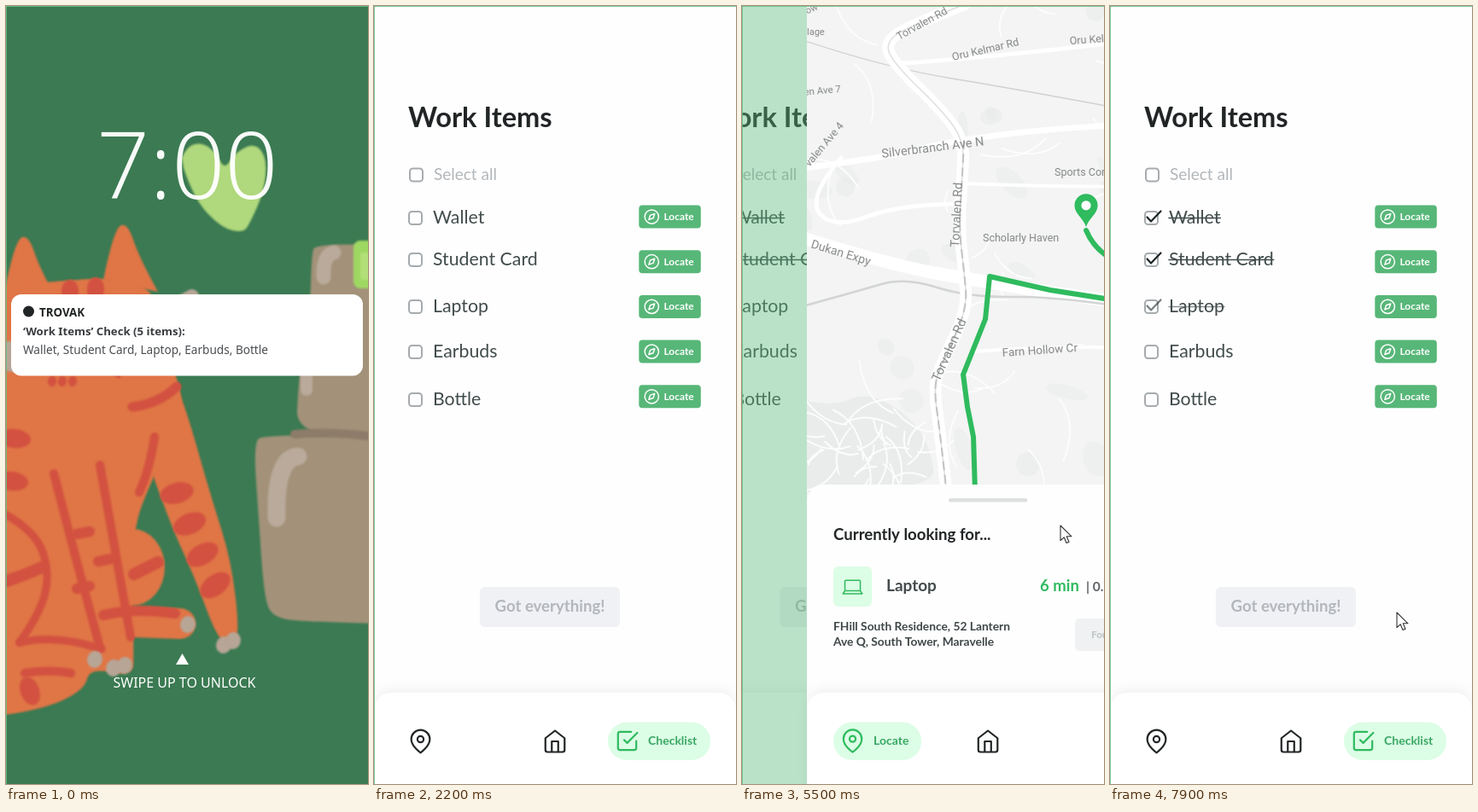
These frames come from a looping animation (424 px wide and 912 px high, 8 s). An HTML page with a canvas:

```html
<!DOCTYPE html>
<html lang="en">
<head>
<meta charset="utf-8">
<title>Packing checklist</title>
<style>
  html, body { margin: 0; width: 100%; height: 100%; overflow: hidden; background: #58b87b; }
  canvas { display: block; width: 424px; height: 912px; }
</style>
</head>
<body>
<canvas id="stage"></canvas>
<script>
const W = 424, H = 912, LOOP = 8000;
const DPR = window.devicePixelRatio || 1;
const GREEN = '#57b778', MINT = '#dcfde6', ROUTE = '#2fbb5e', INK = '#222526';
const BACK = '#58b87b', PAPER = '#fefefe', SLATE = '#414b4b';
const UI = 'Lato, sans-serif', LOCK = '"Noto Sans", sans-serif', MAP = 'Roboto, sans-serif';

const canvas = document.getElementById('stage');
canvas.width = W * DPR;
canvas.height = H * DPR;
let c = canvas.getContext('2d');
c.scale(DPR, DPR);

const ICONS = {
  pin: 'M21 10c0 7-9 13-9 13s-9-6-9-13a9 9 0 0 1 18 0zM15 10a3 3 0 1 1-6 0a3 3 0 1 1 6 0',
  home: 'M3 9l9-7 9 7v11a2 2 0 0 1-2 2H5a2 2 0 0 1-2-2zM9 22V12h6v10',
  check: 'M9 11l3 3L22 4M21 12v7a2 2 0 0 1-2 2H5a2 2 0 0 1-2-2V5a2 2 0 0 1 2-2h11',
  compass: 'M22 12a10 10 0 1 1-20 0a10 10 0 1 1 20 0M16.2 7.8l-2.1 6.3-6.3 2.1 2.1-6.3z',
  laptop: 'M5 5h14a1 1 0 0 1 1 1v10H4V6a1 1 0 0 1 1-1zM2 19h20l-2-3H4z',
  close: 'M6 6l12 12M18 6L6 18'
};
for (const k in ICONS) ICONS[k] = new Path2D(ICONS[k]);
const MARKER = new Path2D('M0 0C-3-10-14-16-14-26A14 14 0 0 1 14-26C14-16 3-10 0 0z');
const ARROW = new Path2D('M0 0V17.5L4.2 13.8L7 20.5L10 19.2L7.2 12.8H13z');
const HAND = new Path2D('M-2 1c0-3 4-3 4 0v8c1-2 4-1.5 4 .5c1-1.5 3.5-1 3.5 1c1-1 3 0 3 2v5c0 5-2 8-7 8s-6-2-8-6l-4-6c-1-2 1-3 3-1.5l1.5 2z');

// ---- helpers ----
const mix = (a, b, p) => a + (b - a) * p;
function ramp(t, start, dur) {
  const u = Math.min(1, Math.max(0, (t - start) / dur));
  return u * u * (3 - 2 * u);
}
function fade(alpha, draw) {
  if (alpha <= 0) return;
  c.save();
  c.globalAlpha *= alpha;
  draw();
  c.restore();
}
function shift(x, draw) {
  c.save();
  c.translate(x, 0);
  draw();
  c.restore();
}
function cover(color) {
  c.fillStyle = color;
  c.fillRect(0, 0, W, H);
}
function text(s, x, y, font, color, align = 'left') {
  c.font = font;
  c.fillStyle = color;
  c.textAlign = align;
  c.fillText(s, x, y);
}
function label(s, x, y, deg = 0, size = 12.5, color = '#858788') {
  c.save();
  c.translate(x, y);
  c.rotate(deg * Math.PI / 180);
  text(s, 0, 0, `${size}px ${MAP}`, color);
  c.restore();
}
function box(x, y, w, h, r, color) {
  c.beginPath();
  c.roundRect(x, y, w, h, r);
  c.fillStyle = color;
  c.fill();
}
function oval(x, y, rx, ry, deg, color) {
  c.beginPath();
  c.ellipse(x, y, rx, ry, deg * Math.PI / 180, 0, 7);
  c.fillStyle = color;
  c.fill();
}
// Soft curve that rounds every inner point.
function trace(p) {
  const n = p.length;
  c.beginPath();
  c.moveTo(p[0], p[1]);
  for (let i = 2; i < n - 4; i += 2)
    c.quadraticCurveTo(p[i], p[i + 1], (p[i] + p[i + 2]) / 2, (p[i + 1] + p[i + 3]) / 2);
  if (n > 4) c.quadraticCurveTo(p[n - 4], p[n - 3], p[n - 2], p[n - 1]);
  else c.lineTo(p[2], p[3]);
}
function shape(p, color) {
  trace(p);
  c.closePath();
  c.fillStyle = color;
  c.fill();
}
function stroke(color, w) {
  c.strokeStyle = color;
  c.lineWidth = w;
  c.lineCap = c.lineJoin = 'round';
  c.stroke();
}
function line(p, color, w) {
  trace(p);
  stroke(color, w);
}
function poly(p, color, w) {
  c.beginPath();
  for (let i = 0; i < p.length; i += 2) c.lineTo(p[i], p[i + 1]);
  stroke(color, w);
}
function icon(name, x, y, size, color, w = 2.2) {
  c.save();
  c.translate(x, y);
  c.scale(size / 24, size / 24);
  c.translate(-12, -12);
  c.strokeStyle = color;
  c.lineWidth = w * 24 / size;
  c.lineCap = c.lineJoin = 'round';
  c.stroke(ICONS[name]);
  c.restore();
}
function layer(draw) {
  const el = document.createElement('canvas'), main = c;
  el.width = W * DPR;
  el.height = H * DPR;
  c = el.getContext('2d');
  c.scale(DPR, DPR);
  draw();
  c = main;
  return el;
}

// ---- wallpaper ----
function drawBag() {
  const bag = '#a39279', shine = '#baaa9b';
  shape([440, 280, 362, 278, 358, 292, 356, 360, 342, 440, 340, 510, 440, 510], bag);
  shape([440, 506, 300, 500, 290, 516, 296, 600, 302, 690, 312, 718, 360, 722, 440, 724], bag);
  line([338, 502, 380, 498, 430, 505], '#8d7c69', 10);
  line([372, 318, 371, 292, 384, 289], shine, 17);
  line([352, 430, 352, 450], shine, 14);
  line([317, 600, 315, 530, 342, 528], shine, 21);
  box(407, 275, 30, 56, 8, '#9ed862');
  box(415, 289, 20, 32, 4, '#b3df78');
}
function drawCat() {
  const orange = '#e07546', red = '#d25140', paw = '#b7a596';
  for (const [x, y] of [[22, 277], [138, 263]])
    shape([x - 24, y + 58, x - 12, y - 1, x + 4, y - 10, x + 18, y + 32, x + 40, y + 72], orange);
  shape([-10, 328, 60, 323, 118, 318, 176, 330, 190, 410, 212, 470, 172, 552, 146, 620,
    150, 760, 148, 786, 98, 776, 92, 802, 40, 826, -10, 832], orange);
  shape([186, 410, 206, 455, 240, 575, 264, 650, 274, 738, 262, 750, 246, 738, 222, 672, 190, 602, 165, 530], orange);
  oval(148, 658, 38, 45, 0, orange);
  line([150, 722, 204, 724], orange, 36);

  for (let i = 0; i < 2; i++) {
    line([56 + 54 * i, 548 - 10 * i, 82 + 46 * i, 650 - 10 * i, 110 + 36 * i, 752 - 12 * i], red, 10);
    oval(75 + 30 * i, 335 - 3 * i, 10, 14, 0, red);
    oval(10 - 3 * i, 507 + 50 * i, 19, 11, 6, red);
  }
  for (let i = 0; i < 4; i++) oval(200 + 15 * i, 571 + 36 * i, 20, 12, -15 - 7 * i, red);
  for (let i = 0; i < 3; i++) line([83 + 25 * (i % 2), 619 + 32 * i, 98 + 25 * (i % 2), 616 + 32 * i], red, 12);
  line([150, 666, 178, 652], red, 14);
  line([114, 714, 150, 705, 198, 712], red, 12);
  line([174, 505, 168, 545, 156, 570], red, 10);
  line([148, 470, 180, 466, 200, 446], red, 11);
  line([-4, 594, 35, 615, 52, 668, 38, 715, 16, 746], red, 9);
  line([16, 746, 60, 736, 112, 754], red, 9);
  line([-5, 676, 20, 668, 42, 658], red, 14);
  line([22, 782, 50, 777, 76, 782], red, 10);
  oval(28, 803, 11, 17, -20, red);

  for (let i = 0; i < 6; i++)
    for (const side of [-1, 1])
      oval(110 + side * (32 + 12 * (i % 3)), 420 - side * 8 + 12 * (i % 2), 5, 6, 10, red);
  line([114, 402, 114, 422, 132, 434], red, 5);
  line([172, 372, 198, 350, 218, 340], paw, 16);
  oval(180, 371, 22, 15, -28, paw);
  oval(8, 411, 21, 18, 12, paw);
  for (const [x, y] of [[45, 380], [155, 356]]) {
    oval(x, y, 20, 13, -8, '#f0f1ec');
    oval(x - 2, y, 9, 9, 0, '#2c3330');
  }
  c.save();
  c.rotate(-.04);
  box(80, 384, 38, 25, 9, '#363b39');
  c.restore();
  for (const [x, y] of [[104, 766], [126, 776], [139, 773], [213, 725], [255, 749], [266, 744]])
    oval(x, y, 9, 10, 15, paw);
}
const art = layer(() => {
  c.filter = `blur(${1.2 * DPR}px)`;
  shape([206, 178, 212, 164, 230, 160, 246, 172, 256, 192, 268, 172, 292, 160, 306, 180, 302, 218,
    286, 254, 278, 266, 252, 260, 220, 226, 208, 190], '#b0d87c');
  drawBag();
  drawCat();
});

function lockScreen() {
  c.drawImage(art, 0, 0, W, H);
  text('7:00', 106, 226, '300 109px "Open Sans", sans-serif', 'rgba(255,255,255,.96)');
  c.beginPath();
  c.moveTo(199, 772);
  c.lineTo(206.5, 759);
  c.lineTo(214, 772);
  c.fillStyle = '#fff';
  c.fill();
  text('SWIPE UP TO UNLOCK', 209, 799, `500 16px ${LOCK}`, '#fff', 'center');
}
function notice() {
  box(6, 338, 412, 95.5, 12, '#fff');
  oval(26.5, 358, 6.5, 6.5, 0, INK);
  text('TROVAK', 39, 364, `600 13.3px ${LOCK}`, INK);
  text('‘Work Items’ Check (5 items):', 20, 386, `600 13.2px ${LOCK}`, '#3a3d3f');
  text('Wallet, Student Card, Laptop, Earbuds, Bottle', 20, 408, `13.6px ${LOCK}`, '#4a4d50');
}

// ---- checklist ----
const ITEMS = [['Wallet', 255], ['Student Card', 304], ['Laptop', 359], ['Earbuds', 412], ['Bottle', 468]];

function tickBox(x, y) {
  c.beginPath();
  c.roundRect(x - 7.5, y - 7.5, 15, 15, 3.5);
  stroke('#a6abae', 2);
}
function navBar() {
  c.save();
  c.shadowColor = 'rgba(0,0,0,.05)';
  c.shadowBlur = 14 * DPR;
  c.shadowOffsetY = -5 * DPR;
  box(0, 805, W, 130, 20, '#fff');
  c.restore();
  icon('home', 212, 862, 30, INK);
}
function navPill(x, w, name, title) {
  box(x, 839.5, w, 44.5, 22, MINT);
  icon(name, x + 22.5, 861.5, 28.5, ROUTE);
  text(title, x + 47, 866, `bold 14px ${UI}`, '#38a762');
}
function checklist(done) {
  text('Work Items', 40, 142, `bold 32.6px ${UI}`, INK);
  tickBox(49.5, 198);
  text('Select all', 70, 204, `19px ${UI}`, '#b3b7ba');
  ITEMS.forEach(([name, base], i) => {
    const y = base - 6.5, by = 233.5 + 52.7 * i, font = `21.3px ${UI}`;
    tickBox(48.5, y);
    text(name, 69, base, font, SLATE);
    const end = 69 + c.measureText(name).width;
    fade(done[i] || 0, () => {
      poly([43.5, y - 1, 48, y + 4, 59.5, y - 8], '#1d2628', 2.2);
      poly([69, y, end, y], SLATE, 1.6);
    });
    box(310.3, by, 72.5, 27, 4, GREEN);
    icon('compass', 325.3, by + 13.5, 19.5, '#fff', 1.5);
    text('Locate', 339.5, by + 17.5, `bold 11.9px ${UI}`, '#fff');
  });
  box(124, 681, 164, 47, 6, '#f0f1f5');
  text('Got everything!', 206, 710, `bold 18.6px ${UI}`, '#b3b7bb', 'center');
  navBar();
  icon('pin', 54.5, 862, 29, INK);
  navPill(274, 120, 'check', 'Checklist');
}
function listPage(done) {
  cover(PAPER);
  checklist(done);
}

// ---- locate page ----
const MAIN_ROAD = [185, -2, 128, 20, 90, 42, 104, 70, 158, 122, 184, 158, 182, 200, 178, 260,
  184, 310, 188, 355, 160, 415, 148, 445, 156, 500, 163, 565];
const map = layer(() => {
  let seed = 11;
  const rnd = () => (seed = seed * 16807 % 2147483647) / 2147483647;
  cover('#f3f4f3');
  for (let i = 0; i < 24; i++)
    oval(rnd() * W, rnd() * 560, 8 + rnd() * 18, 5 + rnd() * 10, rnd() * 90, 'rgba(226,229,227,.3)');
  shape([-5, 462, 30, 470, 70, 452, 120, 480, 146, 520, 150, 570, -5, 570], '#eaecec');
  for (let i = 0; i < 60; i++) {
    const campus = i < 26, x = campus ? rnd() * 120 : rnd() * W, y = campus ? 475 + rnd() * 80 : rnd() * 550;
    const a = rnd() * 6.3, n = 12 + rnd() * 28;
    line([x, y, x + n * Math.cos(a), y + n * Math.sin(a),
      x + 2 * n * Math.cos(a + .6), y + 2 * n * Math.sin(a + .6)], '#fcfdfc', 2);
  }
  line([-5, 190, 90, 178, 170, 158, 300, 142, 430, 136], '#fff', 7);
  line([40, 178, 0, 225, 30, 262, 110, 232, 180, 232], '#fff', 5);
  line([185, 208, 280, 212, 430, 212], '#fff', 4);
  line([100, 68, 250, 58, 430, 34], '#fff', 5);
  line([195, 405, 340, 395, 430, 405], '#fff', 4);
  line([430, 386, 360, 440, 390, 500, 352, 565], '#fff', 6);
  line([-5, 272, 100, 304, 200, 322, 300, 338, 430, 356], '#fff', 15);
  line([-5, 40, 90, 72, 250, 98, 430, 132], '#d0d2d2', 1.3);
  line([-5, 352, 60, 334, 115, 318, 190, 342, 300, 340, 430, 362], '#d2d4d5', 2.5);
  line(MAIN_ROAD, '#fff', 14);
  line(MAIN_ROAD, '#dcdddd', 1.4);
  c.setLineDash([9, 7]);
  line(MAIN_ROAD.slice(10), '#c0c2c3', 2);
  c.setLineDash([]);
  label('Torvalen Rd', 108, 40, -29);
  label('Oru Kelmar Rd', 171, 64, -13);
  label('Oru Kelmar Rd', 308, 45, -4);
  label('ellow', -10, 14, -24, 11);
  label('lage', 0, 34, 0, 11);
  label('len Ave 7', -6, 105, -5, 11.5);
  label('valen Ave 4', 3, 189, -50);
  label('Silverbranch Ave N', 88, 178, -7, 14.5);
  label('Sports Complex', 290, 199);
  label('Scholarly Haven', 206, 276);
  label('Dukan Expy', 4, 283, 17, 14);
  label('Torvalen Rd', 178, 283, -87, 14.5);
  label('Torvalen Rd', 155, 441, -66, 15);
  label('Farn Hollow Cr', 229, 411, -4, 13.5);
});

function timing(x, time, dist) {
  text(time, x, 686, `bold 18.5px ${UI}`, ROUTE);
  const w = c.measureText(time).width;
  text('| ' + dist, x + w + 8, 686, `bold 15.5px ${UI}`, '#5d6366');
}
function foundButton(bg, fg) {
  box(314, 718, 83, 38, 5, bg);
  text('Found it!', 355.5, 741, `bold 11.3px ${UI}`, fg, 'center');
}
function locatePage(p) {
  c.drawImage(map, 0, 0, W, H);
  fade(1 - p, () => {
    line([327, 263, 335, 282, 368, 304, 430, 313], ROUTE, 6);
    poly([430, 318, 385, 321, 361, 327, 355, 344, 285, 333, 214, 317, 209, 367, 183, 432,
      188, 470, 195, 505, 197, 570], ROUTE, 6);
  });
  fade(p, () => {
    const pale = '#9a9c9d';
    label('Quorl Rd', 279, 96, 0, 13, pale);
    label('Brindlemoor Rd', 260, 125, 4, 12, pale);
    label('Mt Orvel Rise', 367, 104, -16);
    label('Lantern Ave N', 16, 121, 2, 13, pale);
    label('Scholarly Haven', 9, 420, 0, 21, pale);
    c.fillStyle = ROUTE;
    c.fillRect(194, 480, 9, 90);
  });
  c.save();
  c.translate(mix(327, 198, p), mix(259, 475, p));
  const size = mix(.97, 1.23, p);
  c.scale(size, size);
  c.fillStyle = ROUTE;
  c.fill(MARKER);
  oval(0, -26, 5.8, 5.8, 0, '#fff');
  c.restore();

  box(0, 561, W, 370, 20, PAPER);
  box(166, 577, 92, 4.5, 2, '#dedfe0');
  oval(395, 588, 16, 16, 0, '#f3f4f4');
  icon('close', 395, 588, 16, '#333', 1.6);
  text('Currently looking for...', 31, 626, `bold 18.6px ${UI}`, INK);
  box(31, 657, 45, 47, 6, MINT);
  icon('laptop', 53.5, 681, 27, ROUTE, 1.5);
  text('Laptop', 93, 686, `bold 19px ${UI}`, '#444b4d');
  fade(1 - p, () => timing(mix(273, 237, p), '6 min', '0.3 km'));
  fade(p, () => timing(mix(293, 257, p), '> 1 min', '0.05 km'));
  text('FHill South Residence, 52 Lantern', 31, 732, `bold 13.8px ${UI}`, '#3f4648');
  text('Ave Q, South Tower, Maravelle', 31, 750, `bold 13.8px ${UI}`, '#3f4648');
  foundButton('#eff1f2', '#bcc1c3');
  fade(p, () => foundButton(GREEN, '#fff'));

  navBar();
  navPill(31, 103, 'pin', 'Locate');
  icon('check', 370, 862, 28, INK);
}

// ---- cursor: arrival, departure, place, pointing hand ----
const STOPS = [
  [2700, 2700, 365, 853], [3300, 3420, 45, 243], [3600, 3950, 41, 292], [4800, 5208, 341, 357, true],
  [5500, 5500, 373, 609], [6250, 7350, 362, 737, true], [7800, LOOP, 336, 711]
];
function cursor(t) {
  const i = STOPS.findLastIndex(s => s[0] <= t);
  if (i < 0) return;
  const from = STOPS[i], to = STOPS[i + 1] || from;
  const p = ramp(t, from[1], to[0] - from[1] || 1);
  const hand = (p < .15 ? from : p > .85 ? to : [])[4];
  const path = hand ? HAND : ARROW;
  c.save();
  c.translate(mix(from[2], to[2], p), mix(from[3], to[3], p));
  c.fillStyle = '#fff';
  c.fill(path);
  c.strokeStyle = '#333';
  c.lineWidth = 1.1;
  c.lineJoin = 'round';
  c.stroke(path);
  c.restore();
}

// ---- timeline ----
function draw(t) {
  const unlock = ramp(t, 1610, 400), slide = ramp(t, 5208, 400);
  const near = ramp(t, 6500, 400), back = ramp(t, 7300, 400);
  const done = [3430, 3850, 7730].map(start => ramp(t, start, 300));

  if (unlock < 1) {
    cover('#3b7a52');
    fade(unlock, () => cover(PAPER));
    fade(1 - unlock, lockScreen);
    shift(411 * unlock, notice);
    fade(unlock, () => checklist(done));
  } else if (slide < 1) {
    cover(BACK);
    shift(-97 * slide, () => listPage(done));
    fade(slide * .5, () => cover(BACK));
    shift(W * (1 - slide), () => { if (slide > 0) locatePage(0); });
  } else {
    locatePage(near);
    fade(back, () => listPage(done));
  }
  cursor(t);
  c.fillStyle = 'rgba(104,194,136,.85)';
  c.fillRect(0, 0, W, 1);
  c.fillRect(0, 0, 1, H);
}

let start;
function tick(now) {
  if (start === undefined) start = now;
  draw((now - start) % LOOP);
  requestAnimationFrame(tick);
}
draw(0);
requestAnimationFrame(tick);
</script>
</body>
</html>
```
